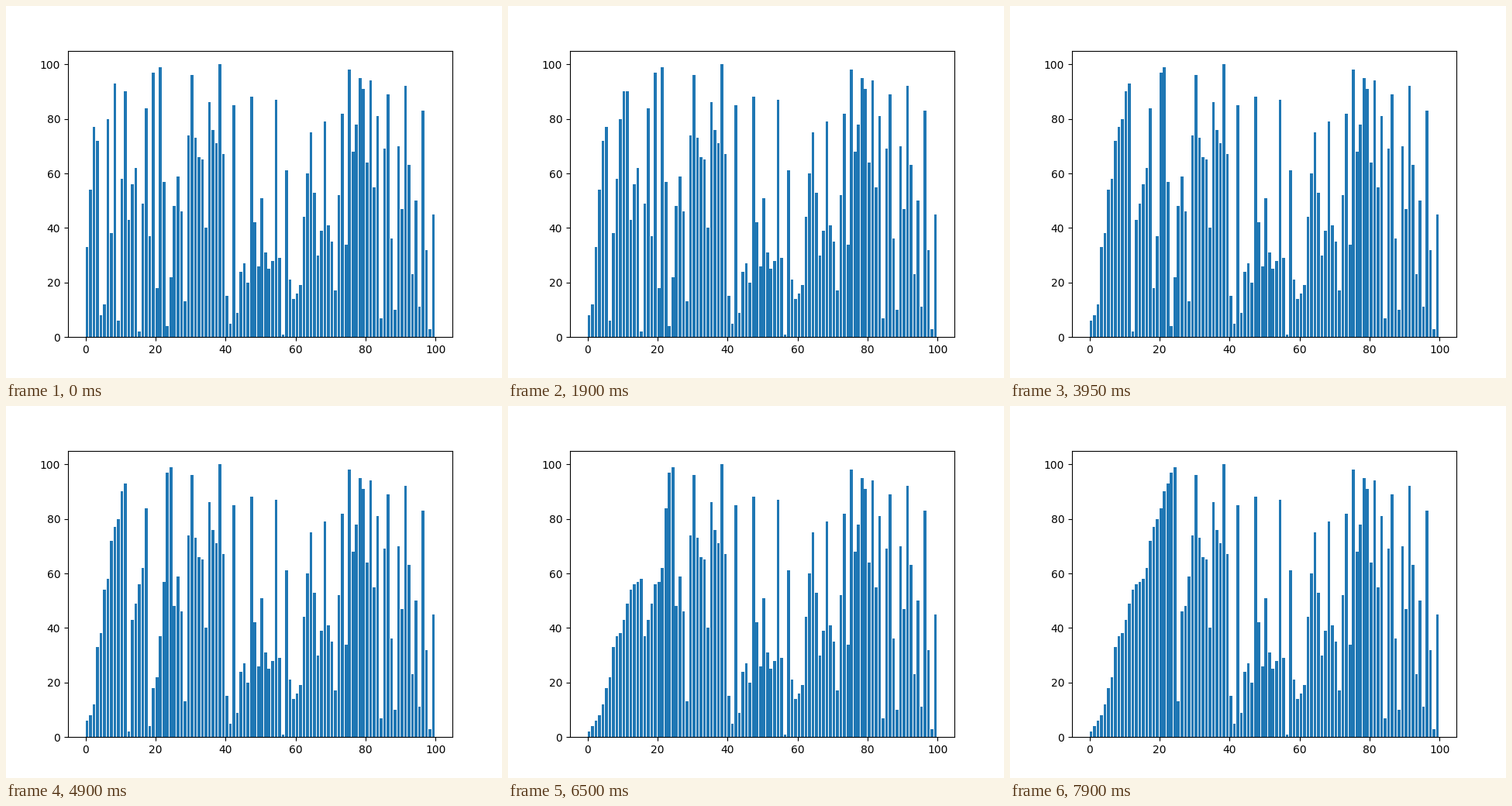
Recreate the animation shown at these times as a matplotlib script. Size 640 by 480 pixels, loop 8000 ms.

```python
from itertools import islice

import matplotlib.pyplot as plt
from matplotlib.animation import FuncAnimation

FRAMES = 160
INTERVAL = 50
SKIPPED_STEPS = 1  # the loop opens just after the first write

VALUES = [
    33, 54, 77, 72, 8, 12, 80, 38, 93, 6, 58, 90, 43, 56, 62, 2, 49, 84, 37, 97,
    18, 99, 57, 4, 22, 48, 59, 46, 13, 74, 96, 73, 66, 65, 40, 86, 76, 71, 100, 67,
    15, 5, 85, 9, 24, 27, 20, 88, 42, 26, 51, 31, 25, 28, 87, 29, 1, 61, 21, 14,
    16, 19, 44, 60, 75, 53, 30, 39, 79, 41, 35, 17, 52, 82, 34, 98, 68, 78, 95, 91,
    64, 94, 55, 81, 7, 69, 89, 36, 10, 70, 47, 92, 63, 23, 50, 11, 83, 32, 3, 45,
]


def merge_sort(data, lo, hi):
    """Sort data[lo:hi] in place, yielding a snapshot after every write."""
    if hi - lo < 2:
        return
    mid = (lo + hi) // 2
    yield from merge_sort(data, lo, mid)
    yield from merge_sort(data, mid, hi)
    for i, value in enumerate(sorted(data[lo:hi]), lo):
        data[i] = value
        yield data.copy()
    yield data.copy()  # short rest after each merge


steps = merge_sort(VALUES.copy(), 0, len(VALUES))
states = list(islice(steps, SKIPPED_STEPS, SKIPPED_STEPS + FRAMES))

fig, ax = plt.subplots(figsize=(6.4, 4.8), dpi=100)
bars = ax.bar(range(len(VALUES)), VALUES, align="edge")


def update(frame):
    for bar, height in zip(bars, states[frame]):
        bar.set_height(height)
    return bars.patches


def init():
    return update(0)


anim = FuncAnimation(fig, update, frames=FRAMES, init_func=init,
                     interval=INTERVAL, repeat=True, repeat_delay=0)
plt.show()
```
